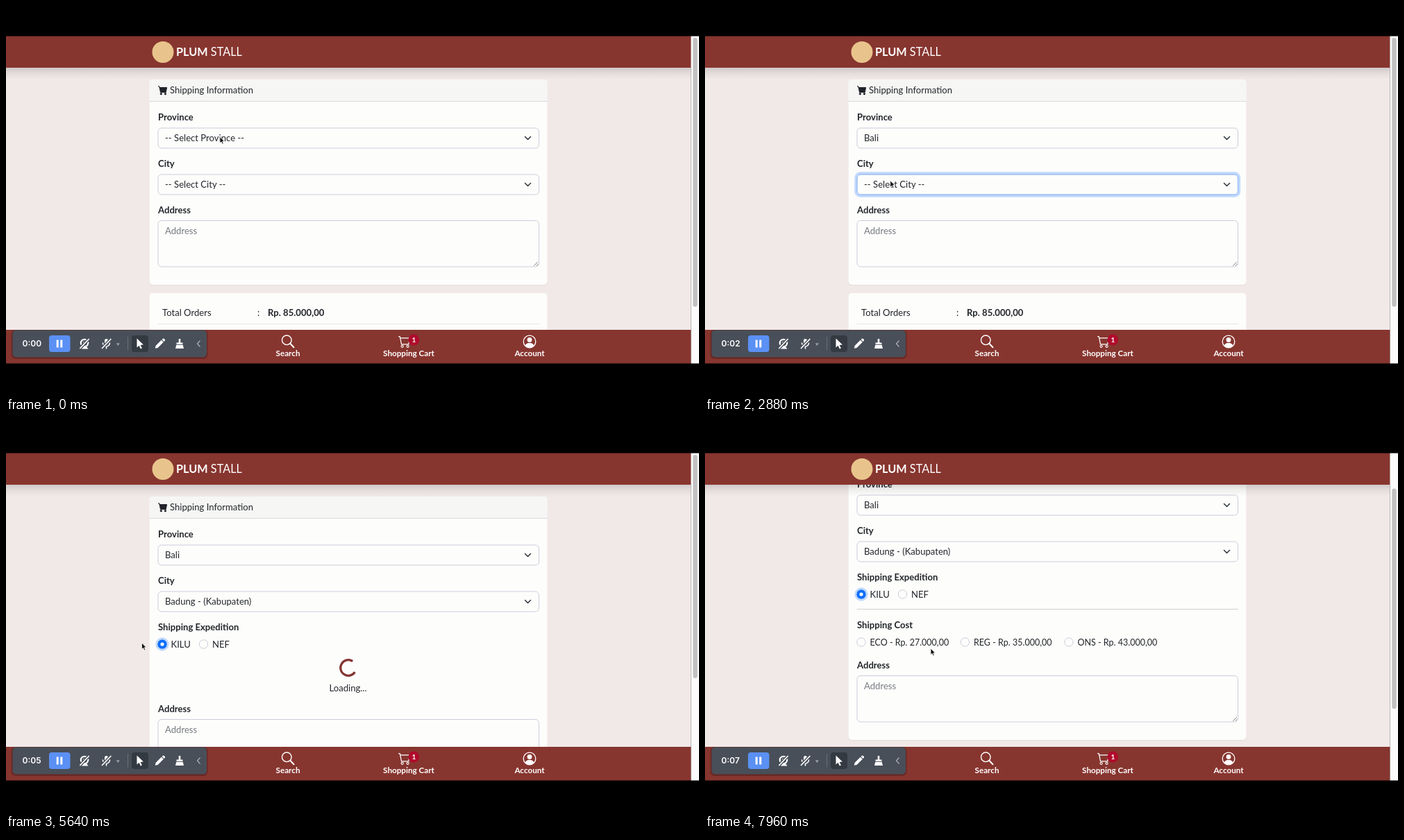
Animation, 998 px wide and 561 px high, one loop 8 s. Source, as an HTML page:

```html
<!DOCTYPE html>
<html lang="en">
<head>
<meta charset="utf-8">
<title>Checkout form</title>
<style>
html, body { margin: 0; width: 100%; height: 100%; overflow: hidden; background: #000; }
svg { display: block; width: 998px; height: 561px; }
text { font: 400 13.1px Lato, "Open Sans", sans-serif; fill: #23262a; }
text.b { font-weight: 700; }
text.cost { font-size: 12.5px; }
text.hint { fill: #75797f; }
text.nav { font-weight: 700; font-size: 11.7px; fill: #fff; text-anchor: middle; }
text.brand { font-size: 16.3px; fill: #fff; }
text.brand tspan { font-weight: 700; }
text.clock { font: 600 12px Inter, sans-serif; fill: #fff; }
.field { fill: #fdfdfc; stroke: #cccdd8; }
.ring { fill: none; stroke: #0d6efd; stroke-opacity: .25; stroke-width: 3.3; }
.edge { fill: none; stroke: #86b7fe; }
.line { fill: none; stroke-linecap: round; stroke-linejoin: round; }
.white { stroke: #fff; }
</style>
</head>
<body>
<svg id="stage" viewBox="0 0 998 561" xmlns="http://www.w3.org/2000/svg"></svg>
<script>
const LOOP = 8000;
const PAGE_W = 986.5;
const stage = document.getElementById("stage");

const text = (x, y, s, cls = "") => `<text x="${x}" y="${y}" class="${cls}">${s}</text>`;
const rect = (x, y, w, h, attrs) => `<rect x="${x}" y="${y}" width="${w}" height="${h}" ${attrs}/>`;
const line = (d, attrs = "", cls = "") => `<path class="line ${cls}" d="${d}" ${attrs}/>`;
const group = (id, body) => `<g id="${id}">${body}</g>`;
const card = (y, h) =>
  rect(206, y + 1.5, 574, h, 'rx="5" fill="#000" opacity=".035"') +
  rect(206.5, y, 573, h, 'rx="5" fill="#fdfdfc"');

function select(id, y) {
  return rect(219, y, 548.5, 29, 'rx="5" class="field"') +
    group(id + "Focus",
      rect(217, y - 2, 552.5, 33, 'rx="6.5" class="ring"') +
      rect(219, y, 548.5, 29, 'rx="5" class="edge"')) +
    line(`M747.5 ${y + 12.5}l4 4 4-4`, 'stroke="#343a40" stroke-width="1.6"') +
    `<text id="${id}" x="229" y="${y + 19}"></text>`;
}

const radio = (x, y, label, cls) =>
  `<circle cx="${x}" cy="${y}" r="6.2" class="field" stroke="#bfc2cc"/>` + text(x + 12.5, y + 4.5, label, cls);

const cartIcon = (x, y, k, color, solid) =>
  `<g transform="translate(${x} ${y}) scale(${k})" stroke="${color}" fill="${solid ? color : "none"}">` +
  line("M.5 1.5H2L4 11.5H13L14.5 3.5H2.4", `stroke-width="1.1" style="fill:${solid ? color : "none"}"`) +
  '<circle cx="5" cy="14" r="1.4"/><circle cx="12" cy="14" r="1.4"/></g>';

// A white slash with a gap on both sides, for switched-off icons.
const slash = (x, y) => {
  const d = `M${x - 6.2} ${y + 6.5}l12.4-13`;
  return line(d, 'stroke="#484f59" stroke-width="4.4"') + line(d, 'stroke-width="1.7"', "white");
};

const page = rect(0, 43, PAGE_W, 424, 'fill="#f1e9e8"') + group("page",
  group("mainCard", "") +
  '<path d="M206.5 137.5V111a5 5 0 0 1 5-5h563a5 5 0 0 1 5 5v26.5z" fill="#f6f6f5"/>' +
  line("M206.5 137.5H779.5", 'stroke="#d9d9dd"') +
  cartIcon(219, 114.5, .87, "#202329", true) +
  text(236, 126.3, "Shipping Information") +
  text(219, 164.5, "Province", "b") + select("province", 176) +
  text(219, 231.5, "City", "b") + select("city", 243) +
  group("expedition",
    text(219, 298.5, "Shipping Expedition", "b") + radio(225, 319, "KILU") + radio(284.5, 319, "NEF") +
    group("picked",
      '<circle cx="225" cy="319" r="8" class="ring"/><circle cx="225" cy="319" r="6.6" fill="#0d6efd"/>' +
      '<circle cx="225" cy="319" r="2.6" fill="#fff"/>')) +
  group("loading",
    '<path id="spinner" fill="none" stroke="#84352f" stroke-width="3.2" d="M8 -8A11.3 11.3 0 1 0 8 8"/>' +
    text(465.5, 387, "Loading...")) +
  group("costs",
    line("M219 340.5H767.5", 'stroke="#cfcfce"') +
    text(219, 367.5, "Shipping Cost", "b") +
    radio(225, 388, "ECO - Rp. 27.000,00", "cost") + radio(374.5, 388, "REG - Rp. 35.000,00", "cost") +
    radio(524, 388, "ONS - Rp. 43.000,00", "cost")) +
  group("address",
    text(219, 4.5, "Address", "b") +
    rect(219, 15.5, 548.5, 66.5, 'rx="5" class="field"') +
    text(229, 35, "Address", "hint") +
    line("M760.5 80.5l5-5M764 80.5l2-2", 'stroke="#777" stroke-width=".9"') +
    card(120, 150) +
    text(225, 152.5, "Total Orders") + text(362, 152.5, ":") +
    text(377, 152.5, "Rp. 85.000,00", "b") +
    line("M219 164.5H767.5", 'stroke="#e6e6e8"')));

const header =
  rect(0, 89, PAGE_W, 17, 'fill="url(#shade)"') +
  rect(0, 43, PAGE_W, 46, 'fill="#87352f"') +
  '<circle cx="226" cy="66.5" r="15.5" fill="#e8c48c"/>' +
  '<text class="brand" x="245" y="72.3"><tspan>PLUM</tspan> STALL</text>';

const nav =
  rect(0, 467, PAGE_W, 49, 'fill="#87352f"') +
  '<circle cx="404.3" cy="481.8" r="6.8" class="line white" stroke-width="1.4"/>' +
  line("M409.3 486.8l5.2 5.4", 'stroke-width="2"', "white") +
  cartIcon(565, 475, 1.13, "#fff", false) +
  rect(579.5, 473.5, 15.5, 16, 'rx="8" fill="#b00a2c"') +
  '<text class="nav" x="587.3" y="485.3" style="font-size:10px">1</text>' +
  '<circle cx="754" cy="484" r="8.8" class="line white" stroke-width="1.3"/>' +
  '<circle cx="754" cy="481.5" r="3.4" fill="#fff"/>' +
  '<path d="M747.6 490c1.4-3.6 3.6-4 6.4-4s5 .4 6.4 4a8.8 8.8 0 0 1-12.8 0z" fill="#fff"/>' +
  text(406, 505, "Search", "nav") + text(580, 505, "Shopping Cart", "nav") + text(754, 505, "Account", "nav");

const toolbar =
  rect(7.5, 467, 283, 42, 'rx="6" fill="#000" opacity=".22"') +
  rect(9.5, 467.5, 279.5, 39, 'rx="5" fill="#484f59"') +
  '<text id="clock" class="clock" x="23.5" y="491.4"></text>' +
  rect(62, 475, 30.5, 24, 'rx="4" fill="#5b90f4"') +
  rect(72.7, 481.5, 3, 11, 'rx=".6" fill="#fff"') + rect(78.3, 481.5, 3, 11, 'rx=".6" fill="#fff"') +
  '<circle cx="113" cy="486" r="5.2" class="line white" stroke-width="2.2"/>' +
  '<circle cx="113" cy="486" r="2.3" fill="#fff"/><path d="M107.5 494.5h11l-2.3-3h-6.4z" fill="#fff"/>' +
  slash(113, 487) +
  rect(142, 480, 5, 9, 'rx="2.5" fill="#fff"') +
  line("M139.5 486a5 5 0 0 0 10 0M144.5 491v3", 'stroke-width="1.6"', "white") +
  slash(144.7, 487) +
  '<path d="M158.8 486.3h5l-2.5 4z" fill="#9a9fa6"/>' +
  line("M175.5 477.5v18.5", 'stroke="#69707a"') +
  rect(181, 475, 24, 24, 'rx="4" fill="#343a42"') +
  '<path d="M188.5 479.5v13l3.1-2.8 2.3 4.8 2-1-2.3-4.6 4.3-.4z" fill="#fff"/>' +
  '<path d="M214.8 493.8l.8-3.8 8.2-8.2 3 3-8.2 8.2zM224.6 481l1.4-1.3q.8-.6 1.5 0l1.4 1.4q.6.7 0 1.5l-1.3 1.4z" fill="#fff"/>' +
  '<path d="M248.7 480h2.6v5.5h3.2v2.3h-9v-2.3h3.2zM245.3 488.8h9.4l1.3 5.2h-12z" fill="#fff"/>' +
  line("M279.2 483l-3.7 4 3.7 4", 'stroke="#a4a9af" stroke-width="1.4"');

stage.innerHTML =
  '<defs><linearGradient id="shade" x2="0" y2="1"><stop stop-opacity=".14"/>' +
  '<stop offset=".5" stop-opacity=".05"/><stop offset="1" stop-opacity="0"/></linearGradient></defs>' +
  page + header + nav +
  rect(PAGE_W, 43, 998 - PAGE_W, 473, 'fill="#fbfbfb"') +
  rect(989.3, 46, 6.4, 390, 'id="thumb" rx="3.2" fill="#c1c1c1"') +
  rect(0, 0, 998, 43.5, "") + rect(0, 515.5, 998, 46, "") + toolbar +
  '<path id="cursor" d="M0 0V9.3L2.1 7.4 3.6 10.7 5.2 10 3.8 6.8H6.6Z" fill="#111" stroke="#fff" stroke-width=".8" stroke-linejoin="round"/>';

const el = Object.fromEntries([...stage.querySelectorAll("[id]")].map(n => [n.id, n]));

const clamp = x => Math.max(0, Math.min(1, x));
const smooth = x => x * x * (3 - 2 * x);
const fade = (t, start) => smooth(clamp((t - start) / 150));
const show = (node, on) => node.setAttribute("display", on ? "inline" : "none");
const move = (node, x, y) => node.setAttribute("transform", `translate(${x} ${y})`);

// Each stop is [time, ...values].
function track(stops, t, ease = x => x) {
  let i = 0;
  while (i < stops.length - 2 && t >= stops[i + 1][0]) i++;
  const [a, b] = [stops[i], stops[i + 1]];
  const k = ease(clamp((t - a[0]) / (b[0] - a[0])));
  return a.slice(1).map((v, n) => v + (b[n + 1] - v) * k);
}

const pointer = [
  [40, 308, 188.5], [840, 306, 190], [1300, 244, 203], [1720, 244, 203], [1840, 267, 251.5],
  [2840, 267, 251.5], [3640, 236, 292], [3920, 236, 292], [4700, 222, 316], [5320, 222, 316],
  [5600, 195.5, 317], [5680, 195.5, 317], [5880, 204, 317], [6200, 210, 316],
  [6600, 469, 288], [7760, 469, 288], [7960, 325, 325]
];
const scrolling = [[5650, 0], [5880, 46], [6000, 62], [6160, 72]];

const time = { openProvince: 240, pickProvince: 1400, openCity: 2100, pickCity: 3920, pickRadio: 4920, loaded: 7240 };

function draw(t) {
  const hasCity = t >= time.pickCity;
  const picked = t >= time.pickRadio;
  const loaded = t >= time.loaded;
  const addressY = loaded ? 421 : picked ? 412 : hasCity ? 352 : 294;
  const [scroll] = track(scrolling, t);

  el.province.textContent = t < time.pickProvince ? "-- Select Province --" : "Bali";
  el.city.textContent = hasCity ? "Badung - (Kabupaten)" : "-- Select City --";
  el.provinceFocus.setAttribute("opacity", fade(t, time.openProvince) - fade(t, time.openCity));
  el.cityFocus.setAttribute("opacity", fade(t, time.openCity) - fade(t, time.pickRadio));

  show(el.expedition, hasCity);
  show(el.picked, picked);
  show(el.loading, picked && !loaded);
  show(el.costs, loaded);

  if (draw.lastY !== addressY) {
    el.mainCard.innerHTML = card(106, addressY + 2);
    draw.lastY = addressY;
  }
  move(el.address, 0, addressY);
  move(el.page, 0, -scroll);

  // The spinner hangs briefly before the reply arrives.
  const spin = t > 6640 && t < 6840 ? 6640 : t;
  el.spinner.setAttribute("transform", `translate(493 353) rotate(${(spin - 5665) / 750 * 360})`);

  const ratio = 473 / (283 + addressY);
  el.thumb.setAttribute("y", 46 + scroll * ratio);
  el.thumb.setAttribute("height", 473 * ratio);

  el.clock.textContent = "0:0" + Math.max(0, Math.floor((t - 40) / 1000));
  move(el.cursor, ...track(pointer, t, smooth));
}

const start = performance.now();
function tick(now) {
  draw(Math.max(0, now - start) % LOOP);
  requestAnimationFrame(tick);
}
draw(0);
requestAnimationFrame(tick);
</script>
</body>
</html>
```
